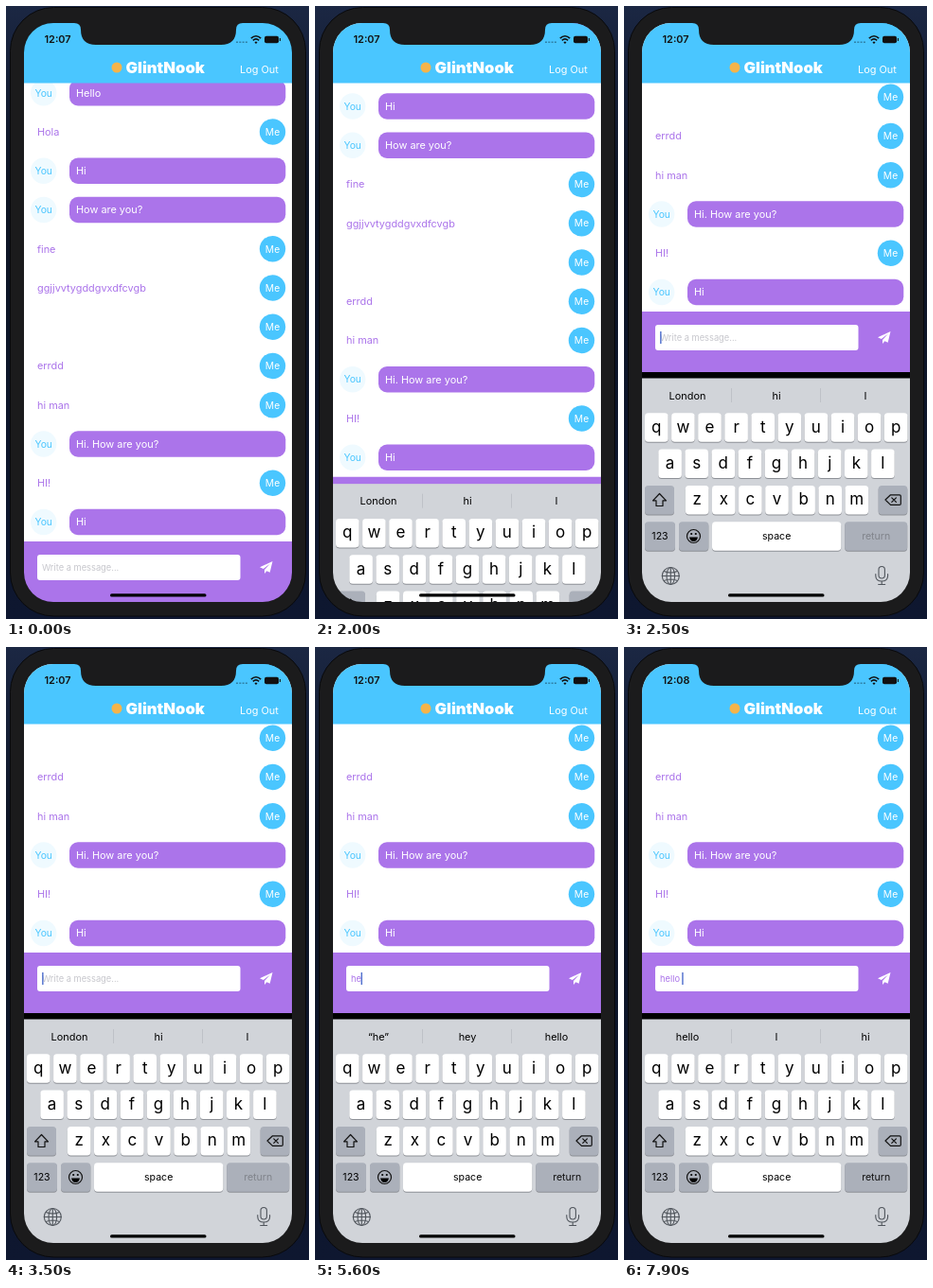
These frames come from a looping animation (320x648 px, 8000 ms). An HTML page:

```html
<!DOCTYPE html>
<html lang="en">
<head>
<meta charset="utf-8">
<title>Chat screen</title>
<style>
html, body { margin: 0; width: 100%; height: 100%; overflow: hidden; background: #0b1120; }
svg { display: block; width: 320px; height: 648px; font-family: Inter, Roboto, sans-serif; }
text { white-space: pre; }
.mid { text-anchor: middle; }
.msg { font-size: 10.9px; }
.tag { font-size: 10.3px; text-anchor: middle; }
.small { font-size: 9.3px; }
.letter { font-size: 17px; text-anchor: middle; }
.label { font-size: 10.6px; text-anchor: middle; }
.line { fill: none; stroke: #111; stroke-width: 1.2; stroke-linejoin: round; stroke-linecap: round; }
.soft { stroke: #50555c; stroke-width: 1.1; }
#page { animation: lift 8s infinite; }
#keyboard { animation: rise 8s infinite; }
@keyframes lift {
  0% { transform: translateY(0); }
  24.375% { transform: translateY(0); animation-timing-function: cubic-bezier(.215, .61, .355, 1); }
  30.625%, 100% { transform: translateY(-243px); }
}
@keyframes rise {
  0% { transform: translateY(237px); }
  24.375% { transform: translateY(237px); animation-timing-function: cubic-bezier(.215, .61, .355, 1); }
  27.4%, 100% { transform: translateY(0); }
}
</style>
</head>
<body>
<svg viewBox="0 0 320 648">
  <defs>
    <linearGradient id="desk" x2="0" y2="1">
      <stop stop-color="#1b2743"/>
      <stop offset=".3" stop-color="#0d1424"/>
      <stop offset="1" stop-color="#0e1730"/>
    </linearGradient>
    <clipPath id="screen"><rect x="19" y="18" width="283" height="612" rx="31"/></clipPath>
  </defs>
  <rect width="320" height="648" fill="url(#desk)"/>
  <rect x="4.5" y="1.5" width="312" height="643.5" rx="46" fill="#1b1b1c" stroke="#08090c"/>

  <g clip-path="url(#screen)">
    <rect x="19" y="18" width="283" height="612"/>
    <g id="page">
      <rect x="19" y="60" width="283" height="507" fill="#fff"/>
      <g id="rows"></g>
      <rect x="19" y="566" width="283" height="64" fill="#ab74ea"/>
      <rect x="33" y="580" width="214.5" height="27" rx="3" fill="#fff"/>
      <text id="hint" class="small" x="38" y="597" fill="#c6c6cc">Write a message...</text>
      <text id="typed" class="small" x="38" y="597" fill="#ab74ea"></text>
      <rect id="caret" y="587" width="1.3" height="13" fill="#3f62c9"/>
      <path d="M281.5 587 L268 593.2 L271.8 595 L279 589.5 L273 596 V600 L275.4 597.2 L278.7 598.8 Z" fill="#fff"/>
    </g>

    <rect x="19" y="18" width="283" height="63.5" fill="#4ac6ff"/>
    <circle cx="117" cy="65" r="5.5" fill="#f5b44a"/>
    <text x="126.5" y="70.5" font-size="16.6" font-weight="900" fill="#fff">GlintNook</text>
    <text x="247" y="70.5" font-size="10.9" fill="#fff">Log Out</text>
    <text id="clock" x="40.5" y="39.3" font-size="10.9" font-weight="600" fill="#111"></text>
    <path d="M243 38.3 H255" stroke="#2f81a8" stroke-width="1.6" stroke-dasharray="2 1.3"/>
    <g fill="none" stroke="#111" stroke-width="1.6">
      <path d="M258.8 34.2 Q264 29.3 269.2 34.2 M260.8 36.3 Q264 33.4 267.2 36.3"/>
      <path d="M263 38 L264 39 L265 38" stroke-width="1.5"/>
    </g>
    <rect x="273" y="31.7" width="15" height="7.5" rx="2" fill="#111"/>
    <path d="M289.4 34 V37" stroke="#111" stroke-width="1.1"/>

    <g id="keyboard">
      <rect x="19" y="393.5" width="283" height="237" fill="#d1d4d9"/>
      <path d="M113.5 404 V419 M207.5 404 V419" stroke="#b9bdc3" stroke-width=".8"/>
      <g id="hints"></g>
      <g id="keys"></g>
      <path class="line" d="M37.5 515.5 L44.5 522.8 H41 V528.5 H34 V522.8 H30.5 Z"/>
      <path class="line" d="M281.5 516.8 H291 Q292.3 516.8 292.3 518 V526.2 Q292.3 527.4 291 527.4 H281.5 L276 522 Z M282.8 519.8 L287.4 524.4 M287.4 519.8 L282.8 524.4"/>
      <circle class="line" cx="73.5" cy="560.5" r="7"/>
      <path d="M69 561.5 H78 Q77 566 73.5 566 Q70 566 69 561.5Z"/>
      <circle cx="71.2" cy="558" r="1.1"/><circle cx="75.8" cy="558" r="1.1"/>
      <g class="line soft">
        <circle cx="49.3" cy="602.5" r="9"/>
        <ellipse cx="49.3" cy="602.5" rx="4.3" ry="9"/>
        <path d="M49.3 593.5 V611.5 M40.3 602.5 H58.3 M42.2 597.5 Q49.3 600.5 56.4 597.5 M42.2 607.5 Q49.3 604.5 56.4 607.5"/>
        <rect x="269" y="592.5" width="6.4" height="12.5" rx="3.2"/>
        <path d="M265.8 600.5 V602.5 Q266 608 272.2 608 Q278.4 608 278.6 602.5 V600.5 M272.2 608 V611.5 M268.7 611.5 H275.7"/>
      </g>
    </g>
    <rect x="110" y="621.2" width="101.5" height="3.3" rx="1.6"/>
  </g>
  <path d="M72 17 V18 Q79 18 79 25 Q79 41 95 41 H227 Q243 41 243 25 Q243 18 250 18 V17 Z" fill="#1b1b1c"/>
</svg>
<script>
const $ = id => document.getElementById(id);

function add(parent, tag, attrs, text = '') {
  const el = document.createElementNS('http://www.w3.org/2000/svg', tag);
  for (const name in attrs) el.setAttribute(name, attrs[name]);
  el.textContent = text;
  parent.append(el);
  return el;
}

// A leading ">" marks a received message.
const messages = ['>Hello', 'Hola', '>Hi', '>How are you?', 'fine', 'ggjjvvtygddgvxdfcvgb',
  '', 'errdd', 'hi man', '>Hi. How are you?', 'HI!', '>Hi'];

messages.forEach((msg, i) => {
  const y = 91.7 + 41.25 * i, rows = $('rows');
  const received = msg[0] === '>';
  const cx = received ? 39.7 : 281.5;
  add(rows, 'circle', { cx, cy: y, r: 13.7, fill: received ? '#effaff' : '#4ac6ff' });
  add(rows, 'text', { class: 'tag', x: cx, y: y + 3.8, fill: received ? '#4ac6ff' : '#fff' }, received ? 'You' : 'Me');
  if (received) add(rows, 'rect', { x: 67, y: y - 13.7, width: 228.3, height: 27.4, rx: 9, fill: '#ab74ea' });
  add(rows, 'text', { class: 'msg', x: received ? 74 : 33, y: y + 4, fill: received ? '#fff' : '#ab74ea' },
    received ? msg.slice(1) : msg);
});

function key(x, y, width, cls, label, fill = '#fff') {
  add($('keys'), 'rect', { x, y: y + 1, width, height: 30.5, rx: 3.6, fill: '#8d9096' });
  add($('keys'), 'rect', { x, y, width, height: 30.5, rx: 3.6, fill });
  const drop = cls === 'letter' ? 20.3 : 19;
  return add($('keys'), 'text', { class: cls, x: x + width / 2, y: y + drop }, label);
}

const grey = '#abb0ba';
[['qwertyuiop', 22], ['asdfghjkl', 36.3], ['zxcvbnm', 64.9]].forEach(([letters, left], row) =>
  [...letters].forEach((c, i) => key(left + 28.1 * i, 430.3 + 38.3 * row, 24.6, 'letter', c)));
key(22, 506.9, 31, 'label', '', grey);
key(268.7, 506.9, 30.6, 'label', '', grey);
key(22, 545.2, 32, 'label', '123', grey);
key(58, 545.2, 31.3, 'label', '', grey);
key(93, 545.2, 136.3, 'label', 'space');
const enter = key(233.2, 545.2, 66, 'label', 'return', grey);

const hints = [67, 161, 255].map(x => add($('hints'), 'text', { class: 'mid msg', x, y: 415.5 }));

const steps = [
  { at: 0, text: '', caret: 38.2, words: ['London', 'hi', 'I'] },
  { at: 4400, text: 'h', caret: 43.7, words: ['“h”', 'hi', 'hey'] },
  { at: 5300, text: 'he', caret: 48.6, words: ['“he”', 'hey', 'hello'] },
  { at: 6100, text: 'hel', caret: 50.9, words: ['“hel”', 'hello', 'help'] },
  { at: 7600, text: 'hello ', caret: 61.3, words: ['hello', 'I', 'hi'] }
];
const focusAt = 1890;

function blink(ms) {
  const p = ms / 1000 % 1;
  if (p < .62) return 1;
  return Math.max(0, 1 - (p - .62) / .13, (p - .9) / .1);
}

function draw(t) {
  const step = steps.findLast(s => t >= s.at);
  $('typed').textContent = step.text;
  $('hint').style.display = step.text ? 'none' : '';
  $('caret').setAttribute('x', step.caret);
  $('caret').setAttribute('opacity', t < focusAt ? 0 : blink(t - Math.max(focusAt, step.at)));
  hints.forEach((h, i) => h.textContent = step.words[i]);
  enter.setAttribute('fill', step.text ? '#111' : '#80848b');
  $('clock').textContent = t < 7400 ? '12:07' : '12:08';
}

let start;
function tick(now) {
  start ??= now;
  draw((now - start) % 8000);
  requestAnimationFrame(tick);
}
draw(0);
requestAnimationFrame(tick);
</script>
</body>
</html>
```
